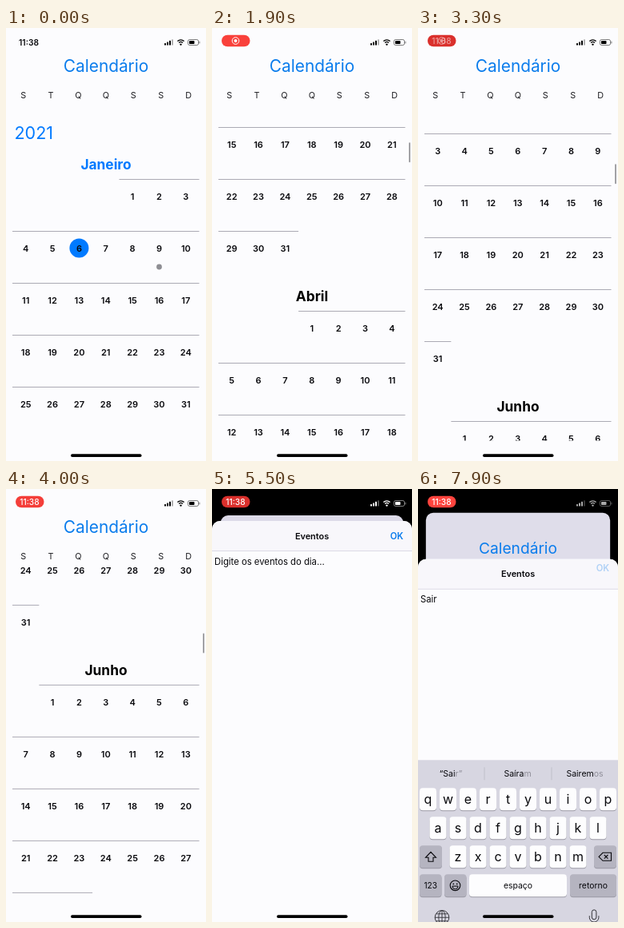
Recreate the animation shown at these times as an HTML page with a canvas. Size 250 px wide and 542 px high, loop 8 s.

```html
<!DOCTYPE html>
<html lang="pt">
<head>
<meta charset="utf-8">
<title>Calendário</title>
<style>
html, body { margin: 0; width: 100%; height: 100%; overflow: hidden; background: #000; }
canvas { display: block; width: 250px; height: 542px; }
</style>
</head>
<body>
<canvas id="stage"></canvas>
<script>
const W = 250, H = 542, LOOP = 8000, STEP = 100;
const BLUE = '#007aff', LINK = '#0a7cec', INK = '#08080c', PAPER = '#fcfcfe';
const canvas = document.getElementById('stage');
const ctx = canvas.getContext('2d');
const dpr = Math.max(1, window.devicePixelRatio || 1);
canvas.width = W * dpr;
canvas.height = H * dpr;

const clamp = v => Math.max(0, Math.min(1, v));
const ramp = (t, a, b) => clamp((t - a) / (b - a));
const mix = (a, b, k) => `rgb(${a.map((v, i) => Math.round(v + (b[i] - v) * k))})`;
const spring = ms => ms <= 0 ? 0 : 1 - (1 + 0.012 * ms) * Math.exp(-0.012 * ms);
const latest = (list, t) => list.filter(e => e[0] <= t).pop();

function setFont(size, weight) {
  ctx.font = `${weight} ${size}px Inter, "Open Sans", sans-serif`;
}

// y is the middle of the capital height
function text(str, x, y, size, weight = 400, color = INK, align = 'center') {
  setFont(size, weight);
  ctx.textAlign = align;
  ctx.fillStyle = color;
  ctx.fillText(str, x, y + size * 0.36);
}

function box(x, y, w, h, r, color) {
  ctx.fillStyle = color;
  ctx.beginPath();
  ctx.roundRect(x, y, w, h, r);
  ctx.fill();
}

function disc(x, y, r, color) {
  ctx.fillStyle = color;
  ctx.beginPath();
  ctx.arc(x, y, r, 0, 7);
  ctx.fill();
}

function line(draw, color, width = 1) {
  ctx.strokeStyle = color;
  ctx.lineWidth = width;
  ctx.beginPath();
  draw();
  ctx.stroke();
}

function poly(points, close) {
  points.forEach(([x, y], i) => i ? ctx.lineTo(x, y) : ctx.moveTo(x, y));
  if (close) ctx.closePath();
}

function faded(alpha, draw) {
  if (alpha <= 0) return;
  ctx.save();
  ctx.globalAlpha *= alpha;
  draw();
  ctx.restore();
}

// Calendar
const MONTHS = [['Janeiro', 31], ['Fevereiro', 28], ['Março', 31], ['Abril', 30],
  ['Maio', 31], ['Junho', 30], ['Julho', 31], ['Agosto', 31]];
const COL = 33.36, ROW = 65, LIST_TOP = 98, LIST_END = 516.5;
const colX = c => 8 + COL * c;

const SCROLL = [[0, 0], [400, 45], [1100, 339], [1900, 850], [3300, 1497], [4400, 1800]];

function slope(i) {
  const a = SCROLL[i - 1], b = SCROLL[i + 1];
  return a && b ? (b[1] - a[1]) / (b[0] - a[0]) : 0;
}

function scrollAt(t) {
  const i = SCROLL.findIndex(p => p[0] > t) - 1;
  if (i < 0) return SCROLL[SCROLL.length - 1][1];
  const [t0, a] = SCROLL[i], [t1, b] = SCROLL[i + 1];
  const d = t1 - t0, u = (t - t0) / d, u2 = u * u, u3 = u2 * u;
  return a * (2 * u3 - 3 * u2 + 1) + b * (3 * u2 - 2 * u3)
    + d * (slope(i) * (u3 - 2 * u2 + u) + slope(i + 1) * (u3 - u2));
}

function drawMonth(index, top, first) {
  const [name, days] = MONTHS[index];
  const rows = Math.ceil((first + days) / 7);
  text(name, 125, top - 18, 17.3, 700, index ? '#000' : BLUE);
  for (let r = 0; r < rows; r++) {
    const y = top + r * ROW;
    const from = r ? 0 : first, to = Math.min(7, first + days - r * 7);
    ctx.fillStyle = '#abaab4';
    ctx.fillRect(colX(from), y, COL * (to - from), 1);
    for (let c = from; c < to; c++) {
      const day = r * 7 + c - first + 1, x = colX(c + 0.5);
      if (!index && day === 6) disc(x, y + 21.5, 12, BLUE);
      if (!index && day === 9) disc(x, y + 45, 3.4, '#8e8e93');
      text(day, x, y + 22, 11, 600);
    }
  }
  return rows;
}

function drawCalendar(t) {
  const s = scrollAt(t);
  text('Calendário', 125, 47.5, 20.8, 400, LINK);
  [...'STQQSSD'].forEach((d, i) => text(d, 21.7 + i * 34.4, 84, 10.8, 400, '#1c1c20'));
  ctx.save();
  ctx.beginPath();
  ctx.rect(0, LIST_TOP, W, LIST_END - LIST_TOP);
  ctx.clip();
  text('2021', 10.5, 131 - s, 21.5, 400, BLUE, 'left');
  let top = 189 - s, first = 4;
  MONTHS.forEach((m, i) => {
    const rows = drawMonth(i, top, first);
    top += rows * ROW + 35;
    first = (first + m[1]) % 7;
  });
  ctx.restore();
  const bar = ramp(t, 100, 300) * (1 - ramp(t, 4300, 4500));
  faded(bar, () => box(246, 108 + s * 0.0416, 2, 25, 1, '#a2a2a6'));
}

// Status bar
function drawStatus(t, p) {
  const g = Math.round(255 * p ** 4), color = `rgb(${g},${g},${g})`;
  const on = ramp(t, 100, 400), clock = ramp(t, 3200, 3400);
  faded(1 - on, () => text('11:38', 28.5, 18.5, 10.2, 600));
  faded(on, () => {
    const glow = t < 6600 ? 0.5 - 0.5 * Math.cos((t - 1100) / 2200 * 2 * Math.PI) : 1;
    box(12, 8.7, 35.5, 14.6, 7.3, mix([218, 48, 44], [255, 68, 62], glow));
    faded(1 - clock, () => {
      line(() => ctx.arc(29.5, 16, 4.3, 0, 7), '#fff', 1);
      disc(29.5, 16, 2, '#fff');
    });
    faded(clock, () => text('11:38', 29.5, 16, 10.2, 500, '#fff'));
  });
  for (let i = 0; i < 4; i++) {
    const h = 2.5 + i * 1.6;
    faded(i < 3 ? 1 : 0.3, () => box(198 + i * 3, 21.5 - h, 2, h, 0.5, color));
  }
  for (const r of [3.6, 6.2]) {
    line(() => ctx.arc(218.5, 21.2, r, -2.3, -0.84), color, 1.3);
  }
  disc(218.5, 20.6, 1.2, color);
  faded(0.5, () => {
    line(() => ctx.roundRect(227.5, 14.5, 13, 7, 2), color, 1);
    box(241.4, 16.6, 1, 2.8, 0.5, color);
  });
  box(229, 16, 6.5, 4, 0.8, color);
}

// Event sheet
const TYPED = [[0, 'Digite os eventos do dia...'], [5600, ''], [6400, 'S'],
  [6800, 'Sa'], [7200, 'Sai'], [7700, 'Sair']];

function drawSheet(t, p) {
  const y = 40 + 502 * (1 - p);
  box(0, y, W, H - y + 20, [10, 10, 0, 0], PAPER);
  box(0, y, W, 37, [10, 10, 0, 0], '#f8f7fb');
  ctx.fillStyle = '#dcdae6';
  ctx.fillRect(0, y + 37, W, 1);
  text('Eventos', 125, y + 18.7, 10.9, 600);
  faded(t >= 7800 ? 0.3 : 1, () =>
    text('OK', 231, y + (t >= 7900 ? 11 : 19), 11.2, 600, LINK));
  const value = latest(TYPED, t)[1];
  text(value, 3, y + 50.5, 11.3, 400, INK, 'left');
  if (t >= 5700 && t < 7800) {
    box(3 + ctx.measureText(value).width, y + 42.5, 1.6, 15, 0.8, LINK);
  }
}

// Keyboard; a bar in a suggestion toggles the faded letters
const HINTS = [
  [0, 'Eu', 'Não', 'O'],
  [6500, '|“”', 'Nã', '|s|u', 'pick'],
  [6600, '“S”', 'Se', 'Só'],
  [6900, '“Sa”', 'Sa|í', 'Sã|o'],
  [7000, '“Sa”', 'Saí', 'São'],
  [7300, '“Sa|i”', 'Sai|a', 'Sai|r'],
  [7400, '“Sai”', 'Saia', 'Sair'],
  [7800, '“Sa|ir”', 'Saí|ram', 'Saire|mos'],
  [7900, '“Sai|r”', 'Saíra|m', 'Sairem|os']
];

function hint(str, x, y) {
  setFont(10.5, 400);
  let left = x - ctx.measureText(str.replaceAll('|', '')).width / 2;
  str.split('|').forEach((part, i) => {
    text(part, left, y, 10.5, 400, i % 2 ? '#8e8d98' : INK, 'left');
    left += ctx.measureText(part).width;
  });
}

function key(x, y, w, label, size, color = '#fdfdfe') {
  box(x, y + 1, w, 28, 4, '#9a99a4');
  box(x, y, w, 28, 4, color);
  if (label) text(label, x + w / 2, y + 14, size, 400);
}

function letters(str, x, y, caps) {
  [...str].forEach((c, i) => {
    const left = x + i * 25;
    key(left, y, 21, '', 0);
    text(caps ? c.toUpperCase() : c, left + 10.5, y + 13.5, 16, 400);
  });
}

function drawIcons() {
  const tone = '#34343a';
  line(() => poly([[16, 433], [22.5, 440], [19, 440], [19, 445], [13, 445], [13, 440], [9.5, 440]], true), INK, 1.1);
  line(() => poly([[226, 439], [231, 434], [241.5, 434], [241.5, 444], [231, 444]], true), INK, 1.1);
  line(() => {
    poly([[232.8, 436.7], [237.4, 441.3]]);
    poly([[237.4, 436.7], [232.8, 441.3]]);
  }, INK, 1.1);

  line(() => ctx.arc(46.5, 475, 6.3, 0, 7), INK, 1.1);
  disc(44.3, 473, 0.9, INK);
  disc(48.7, 473, 0.9, INK);
  line(() => { ctx.arc(46.5, 475.8, 3.6, 0, Math.PI); ctx.closePath(); }, INK, 1);

  line(() => ctx.arc(30, 515, 8.8, 0, 7), tone, 1);
  line(() => ctx.ellipse(30, 515, 4.2, 8.8, 0, 0, 7), tone, 0.9);
  line(() => {
    poly([[30, 506], [30, 524]]);
    poly([[21, 515], [39, 515]]);
    poly([[23, 510.5], [37, 510.5]]);
    poly([[23, 519.5], [37, 519.5]]);
  }, tone, 0.9);

  line(() => ctx.roundRect(217.3, 505.5, 5.6, 12, 2.8), tone, 1);
  line(() => {
    ctx.moveTo(214.3, 513);
    ctx.lineTo(214.3, 515);
    ctx.arc(220.1, 515, 5.8, Math.PI, 0, true);
    ctx.lineTo(225.9, 513);
    poly([[220.1, 521], [220.1, 524]]);
    poly([[216.5, 524], [223.7, 524]]);
  }, tone, 1);
}

function drawKeyboard(t, p) {
  if (t <= 5500) return;
  const caps = t < 6400, mod = '#b5b4c0';
  ctx.save();
  ctx.translate(0, 224 * (1 - p));
  ctx.fillStyle = '#d7d6e1';
  ctx.fillRect(0, 318, W, 260);
  const [, a, b, c, pick] = latest(HINTS, t);
  if (pick) {
    box(83, 321.5, 84, 26, 4, '#f8f7fb');
  } else {
    ctx.fillStyle = '#c0bfca';
    ctx.fillRect(82.5, 327, 1, 16);
    ctx.fillRect(166.5, 327, 1, 16);
  }
  hint(a, 41, 335);
  hint(b, 124.5, 335);
  hint(c, 208.5, 335);
  letters('qwertyuiop', 2, 353, caps);
  letters('asdfghjkl', 14.5, 389, caps);
  letters('zxcvbnm', 39.5, 425, caps);
  key(2, 425, 28, '', 0, caps ? '#fdfdfe' : mod);
  key(220, 425, 28, '', 0, mod);
  key(2, 461, 27.5, '123', 10.2, mod);
  key(33, 461, 27.5, '', 0, mod);
  key(64, 461, 122, 'espaço', 10.4);
  key(190, 461, 58, 'retorno', 10.4, mod);
  drawIcons();
  ctx.restore();
}

function draw(t) {
  ctx.setTransform(dpr, 0, 0, dpr, 0, 0);
  const leave = spring(t - 7857);
  const p = spring(t - 4500) - leave;
  const k = 1 - 0.087 * p;
  ctx.fillStyle = '#000';
  ctx.fillRect(0, 0, W, H);

  ctx.save();
  ctx.translate(125 * (1 - k), 33 * p);
  ctx.scale(k, k);
  box(0, 0, W, H, p > 0 ? 10 : 0, mix([252, 252, 254], [220, 218, 232], p));
  drawCalendar(t);
  ctx.restore();

  if (p > 0) drawSheet(t, p);
  drawKeyboard(t, spring(t - 5500) - leave);
  drawStatus(t, p);
  box(81, 533.3, 88.5, 3.7, 1.8, '#000');
}

function tick(now) {
  draw(Math.floor((now % LOOP) / STEP) * STEP);
  requestAnimationFrame(tick);
}
draw(0);
requestAnimationFrame(tick);
</script>
</body>
</html>
```
